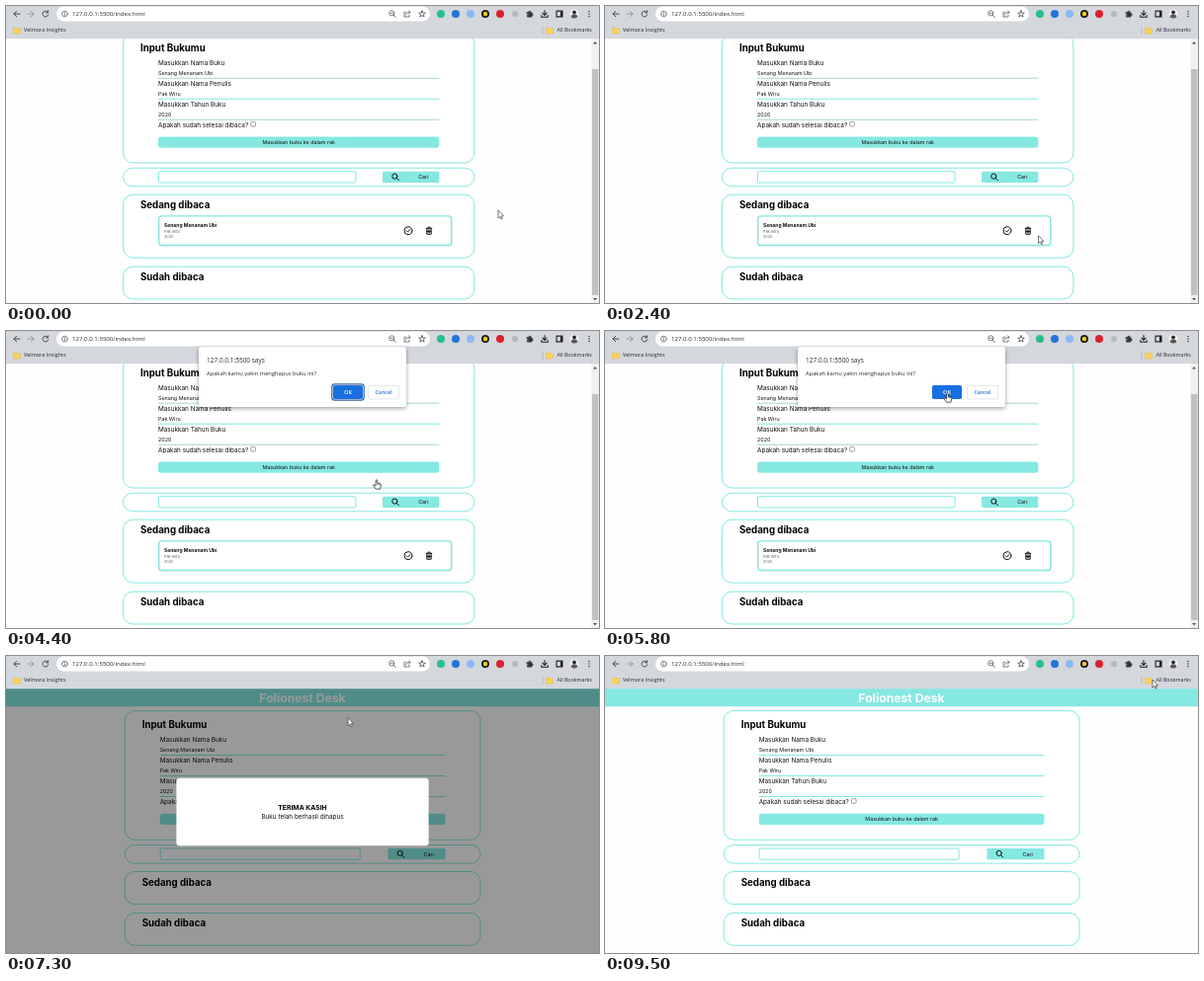
Animation, 600 px wide and 301 px high, one loop 9.6 s. Source, as an HTML page:

```html
<!DOCTYPE html>
<html lang="id">
<head>
<meta charset="utf-8">
<title>Rak buku</title>
<style>
  html, body { margin: 0; width: 100%; height: 100%; overflow: hidden; background: #fff; }
  svg { display: block; width: 600px; height: 301px; }
  text { font-family: Inter, sans-serif; font-size: 6.4px; fill: #111; white-space: pre; }
  .ui { font-family: "Open Sans", sans-serif; fill: #27292d; }
  .h { font-size: 9.7px; font-weight: 700; fill: #000; }
  .s { font-size: 5.35px; }
  .mid { text-anchor: middle; }
  .ic { fill: none; stroke: #45484d; stroke-width: 1; stroke-linecap: round; stroke-linejoin: round; }
</style>
</head>
<body>
<svg id="stage" viewBox="0 0 600 301" xmlns="http://www.w3.org/2000/svg"></svg>
<script>
const TEAL = '#85e8e1', LOOP = 9600, STEP = 100;
const OPEN = 3800, CLICK = 5900, CLOSED = 6000, DONE = 7400;

const rect = (x, y, w, h, r, fill, more = '') =>
  `<rect x="${x}" y="${y}" width="${w}" height="${h}" rx="${r}" fill="${fill}" ${more}/>`;
const text = (x, y, s, cls = '', more = '') => `<text x="${x}" y="${y}" class="${cls}" ${more}>${s}</text>`;
const dot = (x, y, r, fill) => `<circle cx="${x}" cy="${y}" r="${r}" fill="${fill}"/>`;
const icon = (x, y, d, more = '') => `<path class="ic" transform="translate(${x} ${y})" d="${d}" ${more}/>`;
const group = (id, body, more = '') => `<g id="${id}" ${more}>${body}</g>`;
const outline = w => `stroke="${TEAL}" stroke-width="${w}"`;
const panel = (x, y, w, h) => rect(x + .5, y + .5, w - 1, h - 1, 10, '#fff', outline(1));

const LENS = 'M1.1 1.1 L3.4 3.4 M1.9 -.7 A2.6 2.6 0 1 1 -3.3 -.7 A2.6 2.6 0 1 1 1.9 -.7';

function bookCard(x, y, w) {
  return rect(x + .7, y + .7, w - 1.4, 29.6, 3, '#fff', outline(1.4) + ' filter="url(#soft)"') +
    text(x + 6, y + 12, 'Senang Menanam Ubi', '', 'style="font-size:5px;font-weight:700"') +
    text(x + 6, y + 17.4, 'Pak Wiru', '', 'style="font-size:3.8px;fill:#666"') +
    text(x + 6, y + 22.8, '2020', '', 'style="font-size:3.8px;fill:#666"') +
    icon(x + 253, y + 15.5, 'M4 0 A4 4 0 1 1 -4 0 A4 4 0 1 1 4 0 M-1.8 .1 L-.5 1.4 L1.9 -1.2', 'style="stroke:#111"') +
    icon(x + 274, y + 15.5, 'M-2.8 -2.4 H2.8 M-1 -2.6 V-3.6 H1 V-2.6 M-2.2 -2.2 V3.6 H2.2 V-2.2 M-.8 -.8 V2.2 M.8 -.8 V2.2 M-2 .8 H2',
      'style="stroke:#111;stroke-width:.95"');
}

// One layout serves both views: x = left edge, w = width, dy = scroll
function page(x, w, dy, withBook) {
  const left = x + 36, right = x + w - 36, center = x + w / 2, y = v => v + dy;
  const fields = [['Masukkan Nama Buku', 'Senang Menanam Ubi'], ['Masukkan Nama Penulis', 'Pak Wiru'], ['Masukkan Tahun Buku', '2020']];
  const btn = right - w * .161, grow = withBook ? 31 : 0;
  let s = rect(0, 33, 600, 268, 0, '#fefefe');
  s += panel(x, y(55), w, 131.8) + text(x + 18, y(73), 'Input Bukumu', 'h');
  fields.forEach(([label, value], i) => {
    const top = 21 * i;
    s += text(left, y(87 + top), label) + text(left, y(97 + top), value, 's') +
      rect(left, y(100 + top), right - left, 1, 0, withBook && i !== 1 ? '#a3d3d0' : TEAL);
  });
  s += text(left, y(149.8), 'Apakah sudah selesai dibaca?') +
    rect(left + 93.8, y(144.7), 4.6, 4.6, .8, '#fff', 'stroke="#767676" stroke-width=".7"') +
    rect(left, y(159.7), right - left, 11.3, 3.2, TEAL) +
    text(center, y(167.3), 'Masukkan buku ke dalam rak', 's mid');
  s += panel(x, y(191), w, 19.6) +
    rect(left + .5, y(195), w * .5625 - 1, 11.3, 1.2, '#fff', outline(1)) +
    rect(btn, y(195), right - btn, 11.3, 1.2, TEAL) +
    icon(btn + 13, y(200.6), LENS, 'style="stroke:#111" stroke-width="1"') +
    text(btn + 41.3, y(202.7), 'Cari', 's mid');
  s += panel(x, y(218), w, 34 + grow) + text(x + 18, y(232.5), 'Sedang dibaca', 'h');
  if (withBook) s += bookCard(left, y(239.5), 297.5);
  s += panel(x, y(260) + grow, w, 33.8) + text(x + 18, y(274) + grow, 'Sudah dibaca', 'h');
  return s;
}

function scrollbar() {
  return rect(592, 33, 8, 268, 0, '#f1f1f1') + rect(593, 64, 6.4, 229, 0, '#c1c1c1') +
    '<path d="M594 38.5h4l-2-2.4zM594 296h4l-2 2.4z" fill="#555"/>';
}

function folder(x) {
  return `<path d="M${x} 21.8h2.6l1 1h3.4v5.2h-7z" fill="#fbd15b" stroke="#d9b04a" stroke-width=".4"/>`;
}

function toolbar() {
  const badges = [[440, '#25c08d'], [455, '#2374d8'], [470, '#8bb9f3'], [485, '#1d1c14'], [500, '#dc2030'], [515, '#b5b8bd']];
  let s = rect(0, 0, 600, 33.2, 0, '#d4d7dc') + rect(51, .4, 378, 15.2, 7.6, '#fff');
  s += icon(11, 8, 'M3 0 H-3 M-.3 -2.7 L-3 0 L-.3 2.7') +
    icon(25, 8, 'M-3 0 H3 M.3 -2.7 L3 0 L.3 2.7', 'opacity=".4"') +
    icon(40, 8, 'M2.4 -1.6 A2.9 2.9 0 1 0 2.8 .8 M2.6 -3.2 V-1.2 H.6') +
    icon(59.5, 8, 'M2.8 0 A2.8 2.8 0 1 1 -2.8 0 A2.8 2.8 0 1 1 2.8 0 M0 -.2 V1.4 M0 -1.5 V-1.4', 'style="stroke-width:.7"') +
    text(67, 10.2, '127.0.0.1:5500/index.html', 'ui', 'style="font-size:6.1px"') +
    icon(391, 8, LENS + ' M-1.8 -.7 H.4', 'style="stroke-width:.7"') +
    icon(406, 8, 'M-1 -1.8 H-3 V3 H2 V1.4 M-1.4 1 C-1 -1 .6 -1.6 3 -1.6 M1.4 -3.2 L3.1 -1.6 L1.4 0', 'style="stroke-width:.7"') +
    icon(421, 8, 'M0 -3.3 L.9 -1 L3.3 -.9 L1.4 .6 L2.1 3 L0 1.6 L-2.1 3 L-1.4 .6 L-3.3 -.9 L-.9 -1 Z', 'style="stroke-width:.8"');
  badges.forEach(([x, c]) => s += dot(x, 8, x === 515 ? 3 : 4, c));
  s += dot(485, 8, 2.2, '#f1ce20') +
    icon(530, 8, 'M-2.6 -1.6 H-.9 V-2.7 H.7 V-1.6 H2 V0 H3 V1.4 H2 V3 H-2.6 V1.4 H-1.4 V0 H-2.6 Z', 'style="fill:#303338"') +
    icon(545, 8, 'M0 -3.4 V1 M-2.1 -.8 L0 1.3 L2.1 -.8 M-3.2 1.6 V3.3 H3.2 V1.6', 'style="stroke:#222;stroke-width:1.1"') +
    icon(560, 8, 'M-3 -2.9 H3 V2.9 H-3 Z M1.5 -2.5 V2.5', 'style="stroke:#222;stroke-width:1.1"') +
    rect(562 - .8, 5.4, 1.8, 5.2, 0, '#222') +
    dot(575, 8, 4.6, '#f2f0ed') + dot(575, 6.3, 1.9, '#27282b') +
    '<path d="M571.6 11c.3-3.6 6.5-3.6 6.8 0q-3.4 3-6.8 0z" fill="#5b5754"/>' +
    [-2.5, 0, 2.5].map(d => dot(590, 8 + d, .8, '#3d4045')).join('');
  s += folder(7.5) + text(18, 26.4, 'Velmora Insights', 'ui', 'style="font-size:5.5px"') +
    rect(542.6, 20.5, .8, 8, 0, '#aeb4bd') + folder(546.5) +
    text(557.5, 26.4, 'All Bookmarks', 'ui', 'style="font-size:5.3px"');
  return s;
}

function dialog() {
  return rect(195, 16, 210, 61, 3, '#fff', 'filter="url(#shade)"') +
    text(203, 32, '127.0.0.1:5500 says', 'ui', 'style="font-size:6.5px"') +
    text(203, 44.8, 'Apakah kamu yakin menghapus buku ini?', 'ui', 'style="font-size:5.75px"') +
    group('ring', rect(329.8, 53.8, 32.4, 16.4, 2.6, '#fff', 'stroke="#3c5f98" stroke-width="1.2"')) +
    rect(331, 55, 30, 14, 1.8, '#1a6fe0') +
    text(346, 64.2, 'OK', 'ui mid', 'style="font-size:5.6px;font-weight:600;fill:#fff"') +
    rect(366.3, 55.3, 31.4, 13.6, 1.8, '#fff', 'stroke="#dadce0" stroke-width=".7"') +
    text(382, 64.2, 'Cancel', 'ui mid', 'style="font-size:5.4px;font-weight:600;fill:#2e72d2"');
}

const thanks = rect(0, 33, 600, 268, 0, '#000', 'opacity=".4"') +
  rect(172.4, 123.7, 255.2, 68.6, 3, '#fff') +
  text(300, 156, 'TERIMA KASIH', 'mid', 'style="font-size:6.8px;font-weight:700;fill:#000"') +
  text(300, 165.3, 'Buku telah berhasil dihapus', 'mid');

const pointers =
  group('arrow', '<path d="M0 0V8L1.8 6.4L3 9L4.2 8.5L3.1 5.9H5.4Z" fill="#fff" stroke="#333" stroke-width=".65"/>') +
  group('hand', '<path d="M-.9 .8Q0 -.6 .8 .8V3.6L3.8 4.3Q4.6 4.6 4.4 5.8L3.6 9.6H-1L-3.3 6.3Q-3.4 5 -2.2 5.3L-.9 6.3Z" fill="#fff" stroke="#222" stroke-width=".75"/>' +
    '<path d="M.8 4V5.6M2.2 4.2V5.6M3.4 4.5V5.6" stroke="#222" stroke-width=".5"/>');

const defs = `<defs>
  <filter id="shade" x="-10%" y="-20%" width="120%" height="150%"><feDropShadow dx="0" dy="1.5" stdDeviation="2.2" flood-opacity=".38"/></filter>
  <filter id="soft" x="-5%" y="-20%" width="110%" height="150%"><feDropShadow dx="0" dy=".5" stdDeviation=".7" flood-opacity=".15"/></filter>
</defs>`;

const $ = id => document.getElementById(id);
$('stage').innerHTML = defs +
  group('full', page(118, 356.4, -27.3, true) + scrollbar()) +
  group('empty', page(119.7, 360.8, 0, false) + rect(0, 33, 600, 18.2, 0, TEAL) +
    text(300, 46.8, 'Folionest Desk', 'mid', 'style="font-size:12.2px;font-weight:700;fill:#fff"')) +
  group('thanks', thanks) + toolbar() + group('dialog', dialog()) + group('cursor', pointers);

// time, x, y of the pointer tip
const path = [
  [0, 498, 207], [1000, 498, 207], [2400, 438.5, 232.6], [3000, 428, 228], [4000, 428, 228],
  [4400, 375, 150.5], [4900, 346.5, 62.6], [8000, 346, 62.6], [9400, 554, 24], [LOOP, 554, 24]
];

function tip(t) {
  const i = path.findIndex((p, k) => k && t <= p[0]);
  const [t0, x0, y0] = path[i - 1], [t1, x1, y1] = path[i];
  const u = (t - t0) / (t1 - t0), e = u * u * (3 - 2 * u);
  return [x0 + (x1 - x0) * e, y0 + (y1 - y0) * e];
}

const show = (id, on) => $(id).style.display = on ? '' : 'none';

function draw(now) {
  const t = Math.floor(now % LOOP / STEP) * STEP;
  const closing = t >= CLICK, hand = t >= 2900 && t < CLOSED;
  show('full', !closing);
  show('empty', closing);
  show('thanks', closing && t < DONE);
  show('dialog', t >= OPEN && t < CLOSED);
  show('ring', t < 4900);
  $('dialog').setAttribute('opacity', closing ? .9 : 1);
  $('dialog').setAttribute('transform', `translate(0 ${closing ? -4 : 0})`);
  show('hand', hand);
  show('arrow', !hand);
  $('cursor').setAttribute('transform', `translate(${tip(t).map(v => v.toFixed(1)).join(' ')})`);
}

const start = performance.now();
function tick() {
  draw(performance.now() - start);
  requestAnimationFrame(tick);
}
tick();
</script>
</body>
</html>
```
